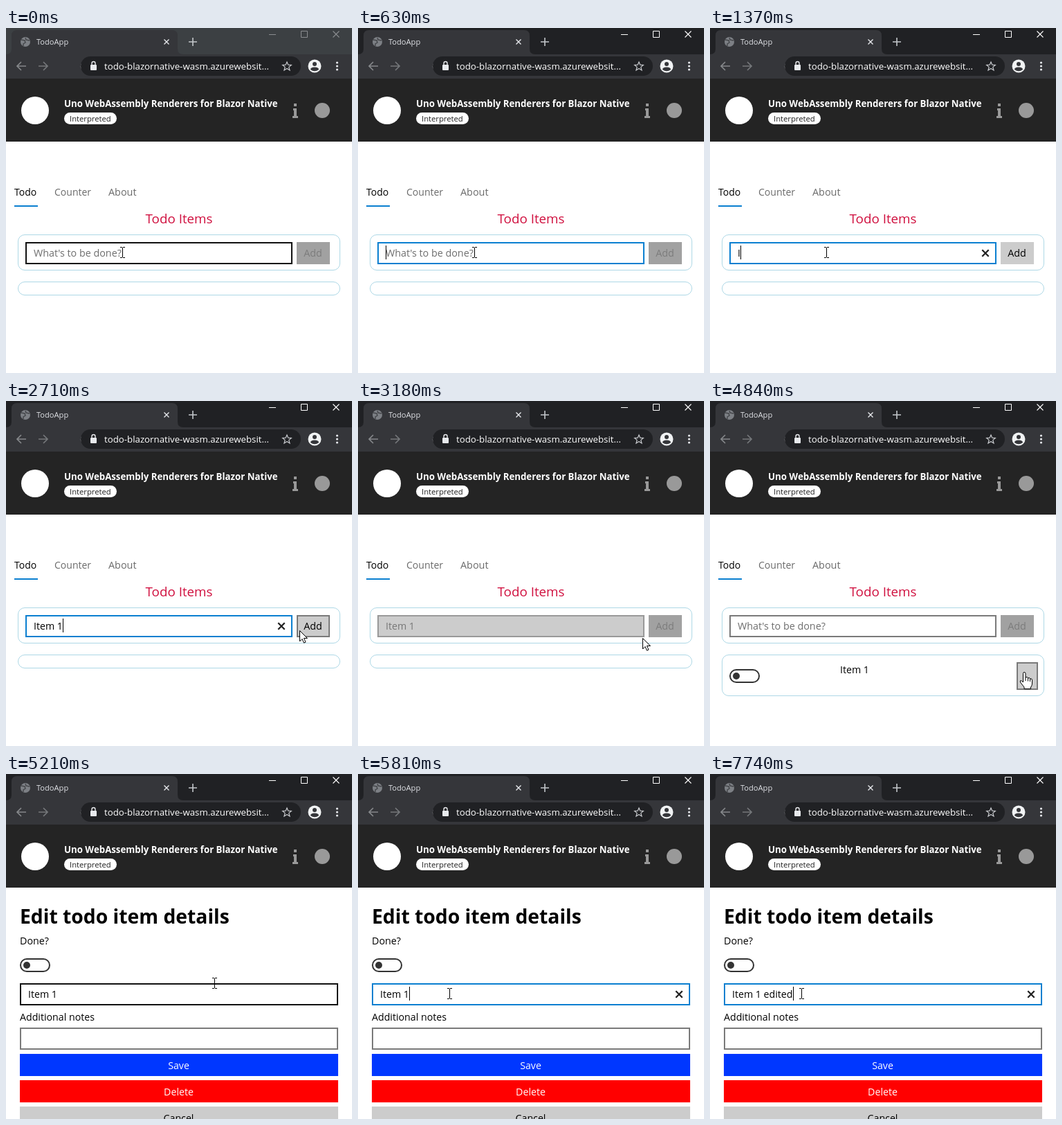
These frames come from a looping animation (500x498 px, 8 s). An HTML page with a canvas:

```html
<!DOCTYPE html>
<html lang="en">
<head>
<meta charset="utf-8">
<title>TodoApp</title>
<style>
html, body { margin: 0; width: 100%; height: 100%; overflow: hidden; background: #fff; }
canvas { display: block; }
</style>
</head>
<body>
<canvas id="stage" width="500" height="498"></canvas>
<script>
const ctx = document.getElementById('stage').getContext('2d');
const LOOP = 8000;
const BLUE = '#0a7fd0', GREY = '#7a7a7a', INK = '#111';
const FACE = '"Open Sans", "Noto Sans", sans-serif';

// Each entry holds until the next one: [ms, value...]
const pointer = [
  [0, 168, 324, 'beam'], [2460, 214, 326, 'beam'], [2580, 318, 330, 'beam'], [2700, 424, 331, 'arrow'],
  [2820, 438, 328, 'arrow'], [3060, 432, 332, 'arrow'], [3180, 411, 342, 'arrow'], [3420, 404, 352, 'arrow'],
  [3540, 394, 365, 'arrow'], [3660, 385, 378, 'arrow'], [3770, 379, 388, 'arrow'], [4010, 376, 393, 'arrow'],
  [4140, 390, 394, 'arrow'], [4260, 422, 393, 'arrow'], [4380, 448, 391, 'hand'], [4480, 457, 391, 'hand'],
  [4720, 455, 391, 'hand'], [4840, 454, 391, 'hand'], [5090, 405, 350, 'arrow'], [5210, 301, 302, 'beam'],
  [5330, 214, 306, 'beam'], [5450, 162, 313, 'beam'], [5570, 139, 316, 'beam'], [5690, 132, 317, 'beam']
];
const newItem = [[0, ''], [1370, 'I'], [1490, 'It'], [1610, 'Item'], [1730, 'Item '], [1850, 'Item 1'], [3300, '']];
const itemName = [
  [0, 'Item 1'], [6550, 'Item 1 '], [7040, 'Item 1 e'], [7290, 'Item 1 ed'],
  [7400, 'Item 1 edit'], [7620, 'Item 1 edite'], [7740, 'Item 1 edited']
];
const at = (track, t) => track.findLast(step => step[0] <= t).slice(1);

function rect(x, y, w, h, fill) {
  ctx.fillStyle = fill;
  ctx.fillRect(x, y, w, h);
}

function frame(x, y, w, h, color, fill = '#fff') {
  rect(x, y, w, h, color);
  rect(x + 2, y + 2, w - 4, h - 4, fill);
}

function pill(x, y, w, h, r, fill, stroke, width = 1) {
  ctx.beginPath();
  ctx.roundRect(x, y, w, h, r);
  if (fill) { ctx.fillStyle = fill; ctx.fill(); }
  if (stroke) { ctx.strokeStyle = stroke; ctx.lineWidth = width; ctx.stroke(); }
}

function circle(x, y, r, fill) {
  ctx.beginPath();
  ctx.arc(x, y, r, 0, 7);
  ctx.fillStyle = fill;
  ctx.fill();
}

function shape(d, stroke, width = 1, fill, x = 0, y = 0) {
  const path = new Path2D(d);
  ctx.save();
  ctx.translate(x, y);
  if (fill) { ctx.fillStyle = fill; ctx.fill(path); }
  if (stroke) { ctx.strokeStyle = stroke; ctx.lineWidth = width; ctx.stroke(path); }
  ctx.restore();
}

function text(str, x, y, size = 14.2, color = '#000', weight = 400, align = 'left') {
  ctx.font = `${weight} ${size}px ${FACE}`;
  ctx.fillStyle = color;
  ctx.textAlign = align;
  ctx.fillText(str, x, y);
  return ctx.measureText(str).width;
}

const cross = (x, y, r, color, width) =>
  shape(`M${-r} ${-r}L${r} ${r}M${-r} ${r}L${r} ${-r}`, color, width, null, x, y);

function toggle(x, y) {
  pill(x + 1, y + 1, 42, 18, 9, '#fff', '#333', 2);
  circle(x + 10, y + 10, 5, '#333');
}

function browser(active) {
  rect(0, 0, 500, 73, active ? '#202124' : '#3c4043');
  shape('M0 38Q8 38 8 30V11Q8 3 16 3H240Q248 3 248 11V30Q248 38 256 38Z', null, 0, '#35363a');
  rect(0, 38, 500, 35, '#35363a');

  circle(28, 20, 7, '#7d8085');
  shape('M22 17l5 1 1 3-3 2v3M28 14l1 3 5 1', '#45474b', 1.5);
  text('TodoApp', 44, 24, 11.1, '#dfe1e5');
  cross(232, 20, 3.5, '#e8eaed', 1.4);
  shape('M264 20H276M270 14V26', '#c4c7cb', 1.6);

  const control = active ? '#fff' : '#8b8d90';
  shape('M380 9.5H390M426.5 4.5H435.5V13.5H426.5Z', control);
  cross(477, 9, 4.5, control, 1.1);

  shape('M29 55H16M22 49L16 55L22 61', '#85878a', 1.7);
  shape('M47 55H60M54 49L60 55L54 61', '#75777a', 1.7);
  shape('M119.3 51.5A5.5 5.5 0 1 0 120.3 56.5', '#e8eaed', 1.7, null, -1, 0);
  shape('M121 48V54H115Z', null, 0, '#e8eaed', -1, 0);

  pill(108, 41, 318, 28, 14, '#202124');
  pill(122, 53, 9, 8, 1, '#e8eaed');
  shape('M124 53V51A2.5 2.5 0 0 1 129 51V53', '#e8eaed', 1.4);
  text('todo-blazornative-wasm.azurewebsit...', 142, 60, 13.25, '#fff');
  shape('M406 49L407.8 53.2L412.3 53.5L408.8 56.4L410 61L406 58.5L402 61L403.2 56.4L399.7 53.5L404.2 53.2Z', '#c8cace', 1.2);

  circle(446, 55, 9.5, '#f1f3f4');
  circle(446, 52, 3, '#35363a');
  shape('M440 60Q440 56.5 446 56.5Q452 56.5 452 60Q446 64.5 440 60Z', null, 0, '#35363a');
  for (const y of [50, 55, 60]) circle(478.5, y, 1.6, '#e8eaed');
}

function banner() {
  rect(0, 73, 500, 91, '#242424');
  circle(42, 119, 20, '#fff');
  text('Uno WebAssembly Renderers for Blazor Native', 84, 114, 13.25, '#fff', 700);
  pill(84, 122, 76, 17, 8.5, '#fff');
  text('Interpreted', 92, 135, 11.27, '#222');
  shape('M416 109H420V113H416ZM415 116H420V127H422V130H414V127H416V119H415Z', null, 0, '#999');
  circle(457, 119, 11, '#999');
}

function field(x, y, w, value, options) {
  const { border, fill, color, hint, caret, clear } = options;
  frame(x, y, w, 32, border, fill);
  const width = text(value, x + 12, y + 21, 14.2, color || '#000');
  if (hint && !value) text(hint, x + 12, y + 21, 14.3, '#6e6e6e');
  if (caret) rect(Math.round(x + 12 + width), y + 5, 1, 20, '#000');
  if (clear) cross(x + w - 16, y + 16, 4.7, '#222', 2.3);
}

function listPage(t) {
  text('Todo', 12, 242, 14);
  text('Counter', 70, 242, 14, '#6a6a6a');
  text('About', 148, 242, 14.4, '#6a6a6a');
  rect(12, 256, 34, 2, BLUE);
  text('Todo Items', 250, 282, 18.8, '#d0103f', 400, 'center');

  const added = t >= 3300;
  pill(17.5, 298.5, 465, 51, 9.5, '#fff', '#add8e6');
  pill(17.5, 366.5, 465, added ? 59 : 19, 9.5, '#fff', '#add8e6');

  const [value] = at(newItem, t);
  const busy = t >= 3060 && !added;
  const focused = t >= 630 && t < 2940;
  field(28, 309, 386, value, {
    border: busy ? '#999' : focused ? BLUE : t < 630 ? INK : GREY,
    fill: busy ? '#ccc' : '#fff',
    color: busy ? '#777' : '#000',
    hint: "What's to be done?",
    caret: focused && (t < 1120 || t >= 1370),
    clear: focused && value
  });

  const enabled = value && !busy;
  const hover = enabled && t >= 2700;
  frame(420, 309, 48, 32, hover ? GREY : enabled ? '#ccc' : '#a1a1a1', enabled ? '#ccc' : '#a1a1a1');
  text('Add', 443.5, 330, 14.4, enabled ? '#000' : '#7c7c7c', 400, 'center');

  if (added) {
    toggle(28, 387);
    text('Item 1', 188, 393);
    frame(443, 377, 31, 40, t >= 4380 ? GREY : '#ccc', '#ccc');
  }
}

function editPage(t) {
  text('Edit todo item details', 20, 216, 28.3, '#000', 700);
  text('Done?', 20, 246, 14.3);
  toggle(20, 266);

  const focused = t >= 5810;
  field(20, 302, 460, at(itemName, t)[0], {
    border: focused ? BLUE : t < 5210 ? GREY : INK,
    caret: focused && (t < 6430 || t >= 6550),
    clear: focused
  });
  text('Additional notes', 20, 356);
  field(20, 366, 460, '', { border: GREY });

  const buttons = [['Save', '#0037ff', '#fff'], ['Delete', '#f00', '#fff'], ['Cancel', '#ccc', '#000']];
  buttons.forEach(([label, fill, color], i) => {
    rect(20, 404 + 38 * i, 460, 32, fill);
    text(label, 249.5, 426 + 38 * i, 14.2, color, 400, 'center');
  });
}

function drawPointer([x, y, kind]) {
  if (kind === 'beam') {
    shape('M-3 -7.5H0M1 -7.5H4M-3 7.5H0M1 7.5H4M.5 -7V7', '#000', 1, null, x, y);
  } else if (kind === 'arrow') {
    shape('M.5 .5V16L4 12.5L6.5 18.2L9 17L6.5 11.5H11.5Z', '#000', 1, '#fff', x, y);
  } else {
    shape('M-1.5 15V2.5Q-1.5 .5 0 .5Q2 .5 2 2.5V8Q5 6.5 5.5 9Q8 7.5 8.5 10Q11.5 9 11.5 12V17' +
      'Q11.5 20 9.5 22V24.5H0V22L-5.5 15Q-6.5 12 -4 12.5Z', '#000', 1, '#fff', x, y);
    shape('M2 8V13M5.5 9V13.5M8.5 10V14', '#000', 1, null, x, y);
  }
}

function draw(now) {
  const t = now % LOOP;
  rect(0, 0, 500, 498, '#fff');
  browser(t >= 630);
  banner();
  (t < 5090 ? listPage : editPage)(t);
  drawPointer(at(pointer, t));
  requestAnimationFrame(draw);
}
requestAnimationFrame(draw);
</script>
</body>
</html>
```
